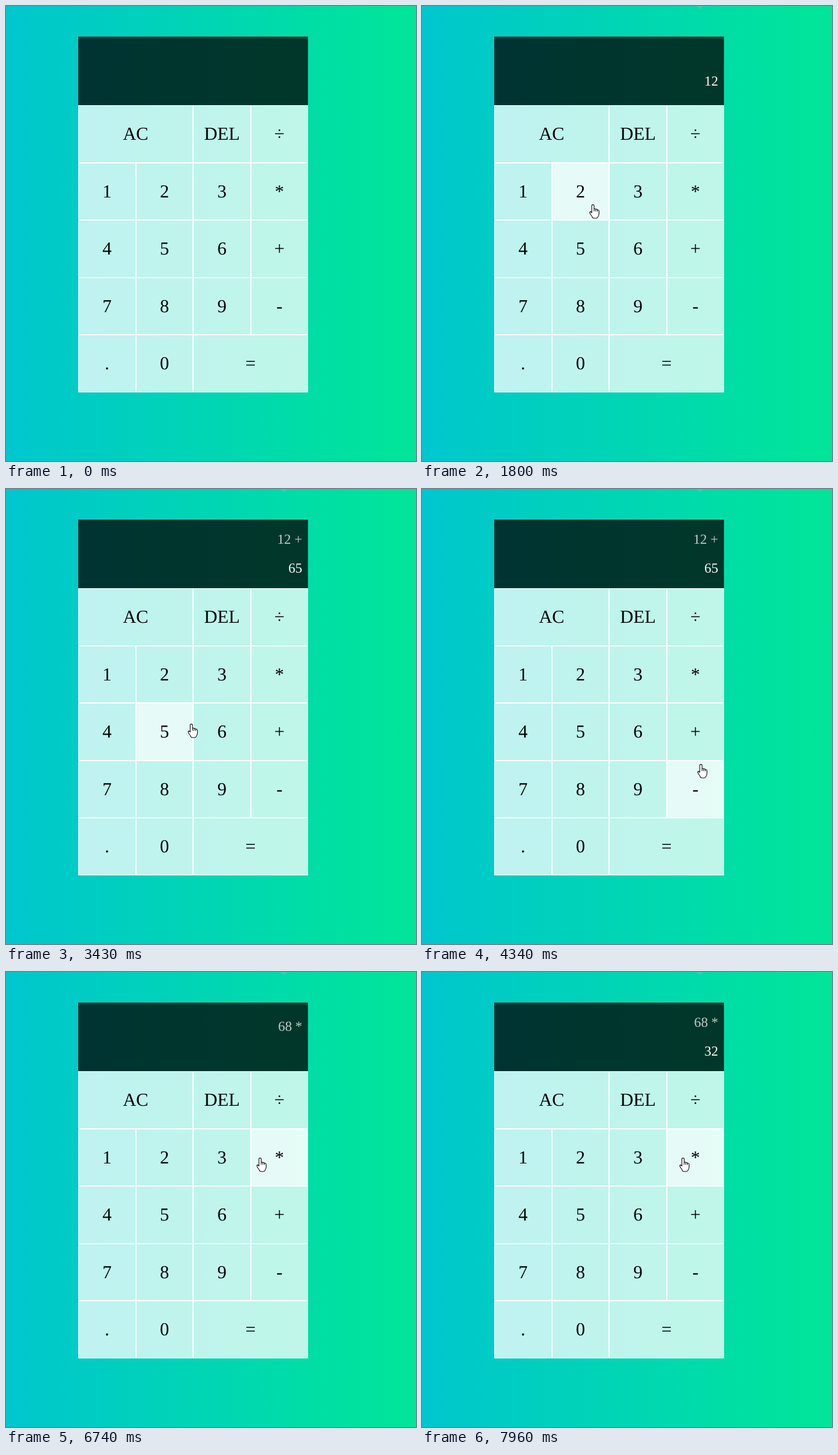
Animation, 710 px wide and 789 px high, one loop 8 s. Source, as an HTML page:

```html
<!DOCTYPE html>
<html lang="en">
<head>
<meta charset="utf-8">
<title>Calculator</title>
<style>
  html, body { margin: 0; width: 100%; height: 100%; overflow: hidden; }
  svg { display: block; width: 710px; height: 789px; }
  text { font-family: "Liberation Serif", "Times New Roman", serif; text-rendering: geometricPrecision; }
  .key text { font-size: 31.8px; text-anchor: middle; }
  .key rect { fill: #fff; fill-opacity: .75; }
  .key.hover rect { fill-opacity: .9; }
  .key path { fill: none; stroke: #fff; }
  .operand { font-size: 23.9px; text-anchor: end; fill: #fff; }
  #previous { fill-opacity: .75; }
  .cursor { fill: #fff; stroke: #000; stroke-width: 1.1; stroke-linejoin: round; }
</style>
</head>
<body>
<svg viewBox="0 0 710 789">
  <defs>
    <linearGradient id="sky" gradientUnits="userSpaceOnUse" x1="-631" y1="0" x2="1279" y2="0">
      <stop offset="0" stop-color="#00aaff"/>
      <stop offset="1" stop-color="#00ff6c"/>
    </linearGradient>
  </defs>
  <rect width="710" height="789" fill="url(#sky)"/>
  <path id="smudge" d="M474 0H486L484 4Q481 6 479 3Z" fill="#78c8b4" fill-opacity=".4"/>
  <rect x="125" y="53" width="398" height="119" fill-opacity=".75"/>
  <text id="previous" class="operand" x="513"></text>
  <text id="current" class="operand" x="513"></text>
  <g id="keys"></g>
  <path id="arrow" class="cursor" d="M.5 .5V16L4 12.6L6.5 18.5L9 17.5L6.6 11.6H11.3Z"/>
  <path id="hand" class="cursor" d="M-2 2.2Q-2 .6 0 .6T2 2.2V8Q4 6.8 4.8 8.6Q6.8 7.6 7.6 9.6
    Q10.4 9 10.5 11.8V16Q10.5 19 8.8 21Q8.4 24 5 24H2Q-.8 24 -1.4 21.4Q-2 19.6 -4 17.6
    L-5.4 14.8Q-5.8 12.8 -4.2 12.6Q-3 12.6 -2 14.4ZM2 8V12M4.8 8.6V12.2M7.6 9.6V12.6"/>
</svg>
<script>
const LOOP = 8000;
const STEP = 100.9;    // time between pointer redraws
const ENTER = 190;     // pointer enters the page
const TRAVEL = 400;    // longest move between keys
const REST = 200;      // pause on a key before the press
const PITCH = 99.5;    // key size
const HOTSPOT = 5;     // hover point, left of the fingertip

// Keys visited: the moment of the press and the fingertip's offset from the key's centre
const VISITS = [
  { key: "1", at: 1210, dx: -3 },
  { key: "2", at: 1800, dx: 21, dy: 22 },
  { key: "+", at: 2300, dx: -18, dy: -15 },
  { key: "6", at: 2700 },
  { key: "5", at: 3200, dx: 23, dy: -24 },
  { key: "-", at: 3930, dx: 10, dy: -43, idle: true },
  { key: "+", at: 4230, dy: 30, idle: true },
  { key: "-", at: 4530, dx: 10, dy: -43 },
  { key: "9", at: 5140, dx: 10 },
  { key: "6", at: 5540, dx: 50, dy: -29, idle: true },
  { key: "*", at: 6250, dx: -21 },
  { key: "3", at: 7150, dx: -6, dy: 4 },
  { key: "2", at: 7570, dx: -35, dy: 5 },
  { key: "*", at: 8160, dx: -21 }
];
const LAYOUT = [["AC", "AC", "DEL", "÷"], [..."123*"], [..."456+"], [..."789-"], [...".0=="]];

const $ = id => document.getElementById(id);

function add(parent, tag, attrs) {
  const el = document.createElementNS("http://www.w3.org/2000/svg", tag);
  for (const name in attrs) el.setAttribute(name, attrs[name]);
  return parent.appendChild(el);
}

const edgeX = col => Math.round(125 + PITCH * col);
const edgeY = row => Math.round(172 + PITCH * row);

const keys = {};
LAYOUT.forEach((labels, row) => labels.forEach((label, col) => {
  if (label === labels[col - 1]) return;
  const span = label === labels[col + 1] ? 2 : 1;
  const x = edgeX(col), right = edgeX(col + span);
  const y = edgeY(row), bottom = edgeY(row + 1);
  const cx = (x + right) / 2, cy = (y + bottom) / 2;
  const el = add($("keys"), "g", { class: "key" });
  add(el, "rect", { x, y, width: right - x, height: bottom - y });
  add(el, "path", { d: `M${x + .5} ${y + .5}H${right - .5}V${bottom - .5}H${x + .5}Z` });
  add(el, "text", { x: cx, y: Math.round(cy + 10) }).textContent = label;
  keys[label] = { el, x, y, right, bottom, cx, cy };
}));

const ease = f => f * f * (3 - 2 * f);

function pointerAt(t) {
  let pos = [474, -14];
  VISITS.forEach(({ key, at, dx = 0, dy = 0 }, i) => {
    const end = at - REST;
    const start = i ? Math.max(VISITS[i - 1].at, end - TRAVEL) : ENTER;
    const f = ease(Math.min(1, Math.max(0, (t - start) / (end - start))));
    const goal = [keys[key].cx + dx, keys[key].cy + dy];
    pos = pos.map((p, axis) => p + (goal[axis] - p) * f);
  });
  return pos;
}

const OPERATIONS = { "+": (a, b) => a + b, "-": (a, b) => a - b, "*": (a, b) => a * b };

function calculate(time) {
  let total = "", operator = "", current = "";
  for (const { key, at, idle } of VISITS) {
    if (idle || at > time) continue;
    if (key in OPERATIONS) {
      total = operator ? OPERATIONS[operator](+total, +current) : current;
      operator = key;
      current = "";
    } else {
      current += key;
    }
  }
  return [operator && `${total} ${operator}`, current];
}

function write(id, text, y) {
  $(id).textContent = text;
  $(id).setAttribute("y", y);
}

function place(id, visible, x, y) {
  $(id).style.display = visible ? "" : "none";
  $(id).setAttribute("transform", `translate(${Math.round(x)} ${Math.round(y)})`);
}

function draw(time) {
  const [previous, current] = calculate(time);
  write("previous", previous, current ? 95 : 102);
  write("current", current, previous ? 145 : 138);

  const shown = time >= ENTER;
  const step = Math.floor((time - ENTER) / STEP);
  const [x, y] = pointerAt(ENTER + step * STEP);
  let overKey = false;
  for (const key of Object.values(keys)) {
    const px = x - HOTSPOT;
    const hit = px >= key.x && px < key.right && y >= key.y && y < key.bottom;
    key.el.classList.toggle("hover", hit);
    overKey ||= hit;
  }
  place("hand", shown && overKey, x, y);
  place("arrow", shown && !overKey, x, y);
  $("smudge").style.display = step > 0 ? "" : "none";
}

const begin = performance.now();
function tick() {
  draw((performance.now() - begin) % LOOP);
  requestAnimationFrame(tick);
}
tick();
</script>
</body>
</html>
```
